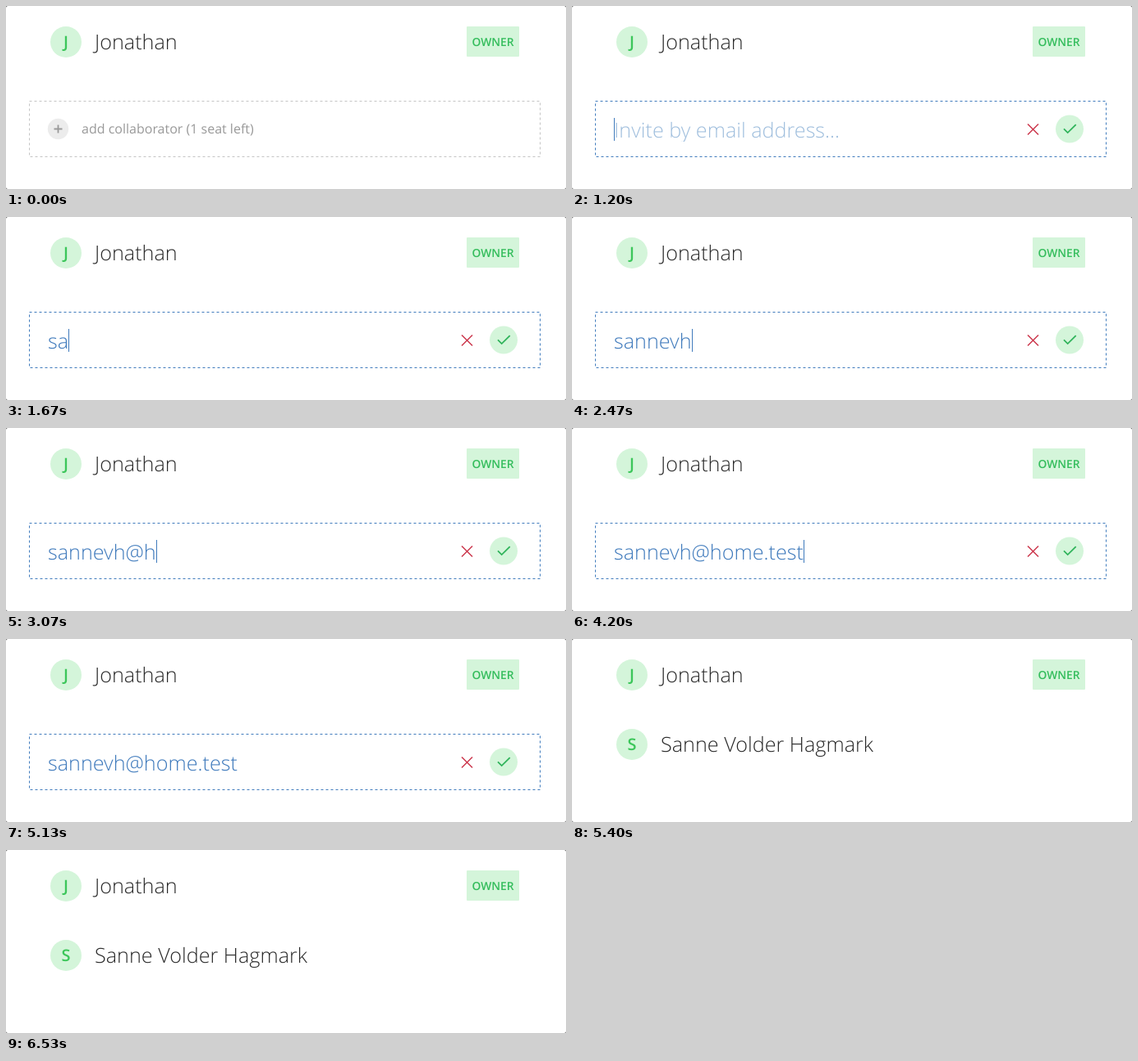
Write an HTML page that moves like this. It is 682 px wide and 224 px high and loops after 6590 ms.

```html
<!DOCTYPE html>
<html lang="en">
<head>
<meta charset="utf-8">
<title>Add a collaborator</title>
<style>
html, body { margin: 0; width: 100%; height: 100%; overflow: hidden; background: #666; }
svg { display: block; width: 682px; height: 224px; }
text { font: 300 25.2px "Open Sans", sans-serif; text-rendering: geometricPrecision; white-space: pre; }
.name { fill: #2a2a2a; }
.pale { fill: #d4f5da; }
.initial, .badge { font-weight: 600; text-anchor: middle; }
.initial { font-size: 20px; fill: #3cc65a; }
.badge { font-size: 13.8px; fill: #34bd5c; }
.hint { font-weight: 400; font-size: 16px; fill: #999; }
.line { fill: none; }
.frame { stroke-dasharray: 3 3; }
</style>
</head>
<body>
<svg viewBox="0 0 682 224">
  <clipPath id="field"><rect x="48" y="130" width="480" height="36"/></clipPath>
  <rect width="682" height="224" rx="2.5" fill="#fff"/>

  <circle class="pale" cx="73" cy="44" r="19"/>
  <text class="initial" x="73" y="50.8">J</text>
  <text class="name" x="108" y="53">Jonathan</text>
  <rect class="pale" x="561" y="25" width="64" height="37" rx="1"/>
  <text class="badge" x="593" y="49">OWNER</text>

  <g id="idle">
    <rect class="line frame" x="28.5" y="116.5" width="622" height="68" stroke="#c4c4c4"/>
    <circle cx="63.5" cy="150.5" r="12.7" fill="#ececec"/>
    <path class="line" d="M58.5 150.5h10M63.5 145.5v10" stroke="#999" stroke-width="1.8"/>
    <text class="hint" x="92" y="156">add collaborator (1 seat left)</text>
  </g>

  <g id="edit">
    <rect class="line frame" x="28.5" y="116.5" width="622" height="68" stroke="#3f7abc"/>
    <g clip-path="url(#field)">
      <text id="placeholder" x="51" y="161" fill="#9fbedd">Invite by email address...</text>
      <text id="typed" x="51" y="161" fill="#3f7abc"></text>
    </g>
    <rect id="caret" y="137" width="1" height="28" fill="#3f7abc"/>
    <path class="line" d="M555 144.5l13 13m0-13l-13 13" stroke="#cc384e" stroke-width="1.5"/>
    <circle class="pale" cx="606" cy="150.5" r="17"/>
    <path class="line" d="M599 150.4l4.7 4.7 10-10" stroke="#2fb35a" stroke-width="1.8"/>
  </g>

  <g id="added">
    <circle class="pale" cx="73" cy="129" r="19"/>
    <text class="initial" x="73" y="136">S</text>
    <text class="name" x="108" y="138">Sanne Volder Hagmark</text>
  </g>
</svg>
<script>
const LOOP = 6590, OPEN = 1200, DONE = 5200, BLINK = 530;
const email = "sannevh@home.test";
const keys = [1530, 1670, 1870, 2000, 2130, 2270, 2470, 2800, 3000,
  3130, 3270, 3400, 3530, 3670, 3800, 3930, 4070];

const $ = id => document.getElementById(id);
const show = (id, on) => $(id).style.display = on ? "" : "none";

function draw(t) {
  const count = keys.filter(k => k <= t).length;
  const last = count ? keys[count - 1] : OPEN;
  show("idle", t < OPEN);
  show("edit", t >= OPEN && t < DONE);
  show("added", t >= DONE);
  show("placeholder", !count);
  show("caret", t - last < BLINK);
  const typed = $("typed");
  typed.textContent = email.slice(0, count);
  $("caret").setAttribute("x", Math.round(51 + (count ? typed.getComputedTextLength() : 0)));
}

const start = performance.now();
function tick() {
  draw((performance.now() - start) % LOOP);
  requestAnimationFrame(tick);
}
tick();
</script>
</body>
</html>
```
